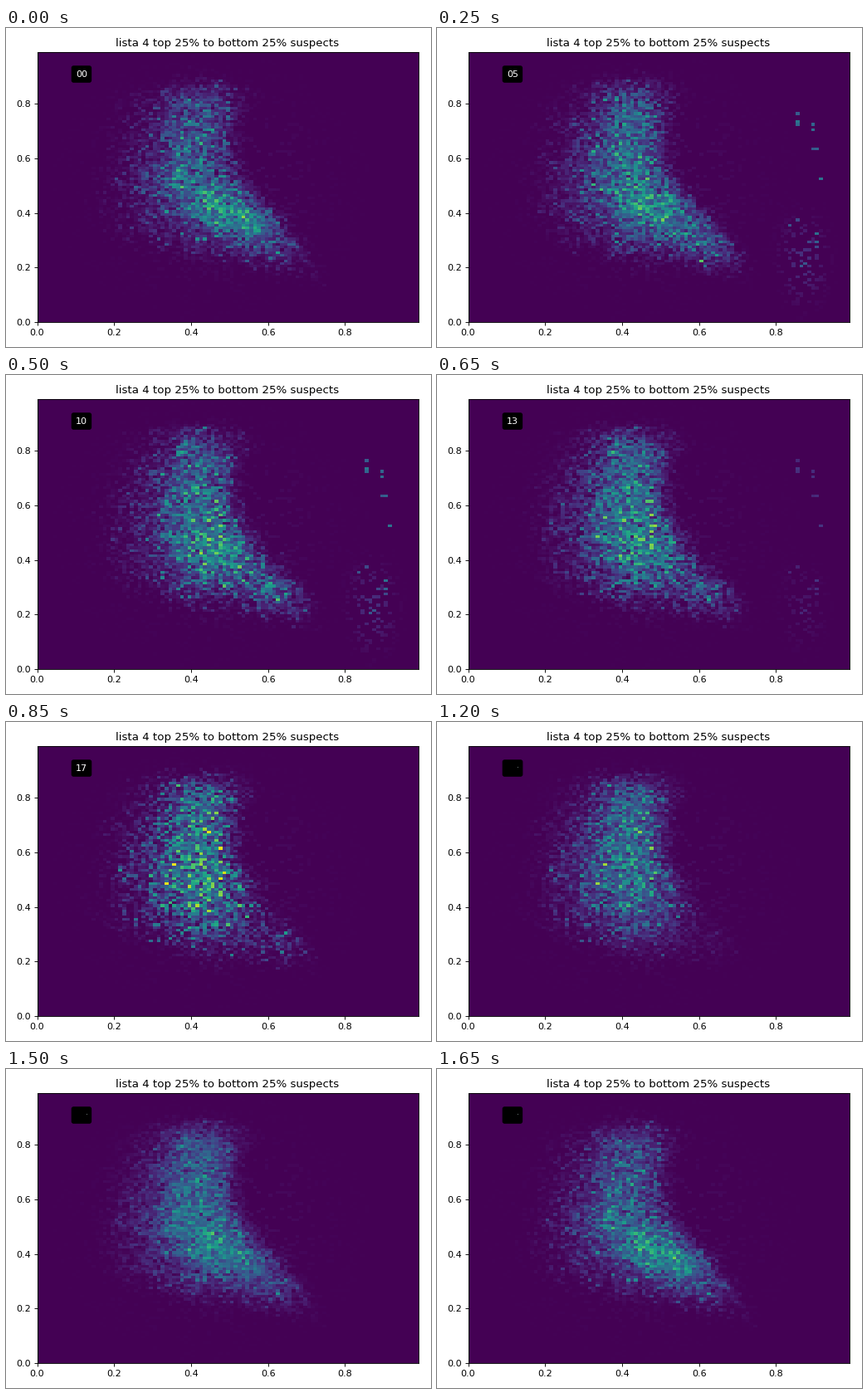
Write a matplotlib script that moves like this. It is 512 by 384 pixels and loops after 1700 ms.

```python
import numpy as np
import matplotlib.pyplot as plt
from matplotlib.animation import FuncAnimation

W, H, DPI = 512, 384, 80
FRAMES, INTERVAL = 34, 50
BINS = 99
DARK_FROM = 21  # the counter turns black on black from here

plt.rcParams["font.family"] = "DejaVu Sans"
rng = np.random.default_rng(4)
axis = (np.arange(BINS) + 0.5) / 100
X, Y = np.meshgrid(axis, axis)


def blob(cx, cy, sx, sy, angle=0):
    a = np.radians(angle)
    u = (X - cx) * np.cos(a) + (Y - cy) * np.sin(a)
    v = (Y - cy) * np.cos(a) - (X - cx) * np.sin(a)
    return np.exp(-0.5 * ((u / sx) ** 2 + (v / sy) ** 2))


def step(d, width):
    return 1 / (1 + np.exp(-d / width))


# Soft outline of the cloud: right edge, top and bottom
right = 0.515 + 0.58 * np.maximum(0, 0.57 - Y) + 0.5 * np.maximum(0, Y - 0.72)
outline = (step(right - X, 0.014) * step(0.875 - Y, 0.014)
           * step(Y - 0.375 + 0.35 * X, 0.022))

column = blob(0.42, 0.69, 0.06, 0.145)
middle = blob(0.45, 0.43, 0.07, 0.11)
diagonal = blob(0.525, 0.385, 0.105, 0.052, -43)
tip = blob(0.63, 0.28, 0.055, 0.05, -30)
haze = blob(0.32, 0.52, 0.065, 0.15)


def cloud(col, mid, diag, end, left):
    return outline * (col * column + mid * middle + diag * diagonal
                      + end * tip + left * haze)


def grain(mean, density):
    """Noise of mean one that gets sparse where the cloud is thin."""
    shape = 0.3 + density * mean
    return rng.gamma(shape, 1 / shape)


# When each mix of the cloud's parts is reached
times = [0, 5, 10, 17, 24, 27, 33]
start = cloud(0.27, 0.16, 0.42, 0.04, 0.10)
means = [start,
         cloud(0.34, 0.25, 0.30, 0.16, 0.10),
         cloud(0.33, 0.33, 0.18, 0.22, 0.10),
         cloud(0.42, 0.34, 0.00, 0.11, 0.14),
         cloud(0.37, 0.24, 0.00, 0.02, 0.13),
         cloud(0.38, 0.31, 0.08, 0.14, 0.12),
         start]

# Later states share part of their grain with earlier ones
a, b, c, d = [grain(m, k) for m, k in zip(means, (13, 12, 10, 6))]
grains = [a, b, c, d, 0.8 * d + 0.2 * b, 0.55 * c + 0.45 * d, 0.9 * a + 0.1 * b]

dust = (rng.random((BINS, BINS)) < 0.12) * blob(0.45, 0.5, 0.19, 0.23) * 0.04

# Sparse group on the far right: faint cells and a few bright ones
side = (rng.random((BINS, BINS)) < 0.2) * blob(0.87, 0.23, 0.035, 0.09) * 0.14
for _ in range(16):
    col = int(np.clip(rng.normal(88, 3), 82, 97))
    side[rng.integers(20, 80), col] = rng.uniform(0.2, 0.4)


def field(n):
    i = min(int(np.searchsorted(times, n, side="right")) - 1, len(times) - 2)
    u = (n - times[i]) / (times[i + 1] - times[i])
    mean = (1 - u) * means[i] + u * means[i + 1]
    rough = ((1 - u) * means[i] * (grains[i] - 1)
             + u * means[i + 1] * (grains[i + 1] - 1))
    # keep the grain from flattening halfway between two states
    img = np.maximum(0, mean + rough / (u * u + (1 - u) ** 2) ** 0.3)
    return 1.1 * np.tanh(img / 1.1) + dust + side * np.interp(n, [0, 5, 10, 15], [0, 1, 1, 0])


fig = plt.figure(figsize=(W / DPI, H / DPI), dpi=DPI)
ax = fig.add_axes([37.55 / W, 30 / H, 459 / W, 325 / H])
image = ax.imshow(field(0), origin="lower", extent=(0, 0.99, 0, 0.99), aspect="auto",
                  cmap="viridis", vmin=0, vmax=1, interpolation="nearest")
ticks = np.arange(5) / 5
ax.set_xticks(ticks)
ax.set_yticks(ticks)
ax.set_title("lista 4 top 25% to bottom 25% suspects", fontsize=12)
label = ax.text(0.1, 0.9, "00", color="white", fontsize=10,
                bbox=dict(facecolor="black", edgecolor="black",
                          boxstyle="round,pad=0.42,rounding_size=0.2"))
speck, = ax.plot([0.1278], [0.911], ",", color="#667070", zorder=5)


def update(n):
    dark = n >= DARK_FROM
    image.set_data(field(n))
    label.set_text(f"{n:02d}")
    label.set_color("black" if dark else "white")
    speck.set_visible(dark)
    return image, label, speck


anim = FuncAnimation(fig, update, frames=FRAMES, interval=INTERVAL,
                     repeat=True, repeat_delay=0, blit=False)
plt.show()
```
